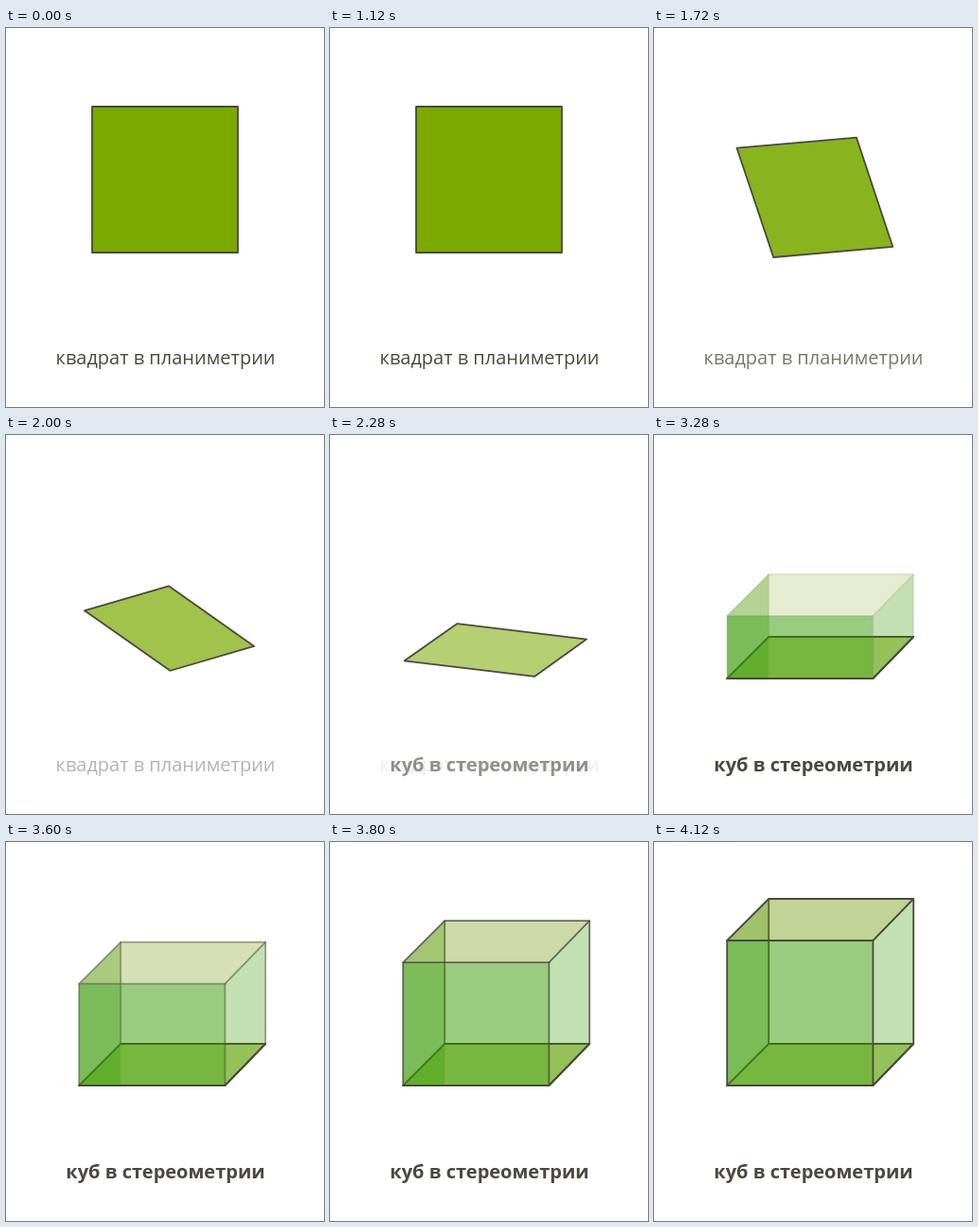
An HTML page with a canvas that plays this animation: 336x400 px, repeating every 4.6 s.

```html
<!DOCTYPE html>
<html lang="ru">
<head>
<meta charset="utf-8">
<title>Квадрат и куб</title>
<style>
html, body { margin: 0; width: 100%; height: 100%; overflow: hidden; background: #fff; }
canvas { display: block; width: 336px; height: 400px; }
</style>
</head>
<body>
<canvas id="stage"></canvas>
<script>
const W = 336, H = 400, LOOP = 4600;
const INK = '#4b493e';
const SQUARE = [[91, 83], [245, 83], [245, 237], [91, 237]];
// Same corner order: the square turns a quarter while it lies down.
const FLOOR = [[77.2, 257], [121.2, 213], [274.2, 213], [231.4, 257]];
const HEIGHT = 153;

const canvas = document.getElementById('stage');
const ctx = canvas.getContext('2d');
const dpr = window.devicePixelRatio || 1;
canvas.width = W * dpr;
canvas.height = H * dpr;

const progress = (t, start, end) => Math.min(1, Math.max(0, (t - start) / (end - start)));
const soften = x => x - 0.027 * Math.sin(2 * Math.PI * x);
const mix = (a, b, p) => a + (b - a) * p;

function trace(points, closed) {
  ctx.beginPath();
  points.forEach(([x, y]) => ctx.lineTo(x, y));
  if (closed) ctx.closePath();
}

function fill(points, color, alpha) {
  ctx.globalAlpha = alpha;
  ctx.fillStyle = color;
  trace(points, true);
  ctx.fill();
}

function stroke(points, alpha = 1, closed = false) {
  ctx.globalAlpha = alpha;
  ctx.strokeStyle = INK;
  trace(points, closed);
  ctx.stroke();
}

function caption(text, weight, alpha) {
  if (alpha <= 0) return;
  ctx.globalAlpha = alpha;
  ctx.fillStyle = INK;
  ctx.font = weight + ' 20px "Open Sans", "Noto Sans", sans-serif';
  ctx.fillText(text, 168.5, 355);
}

function drawWalls(floor, t) {
  const rise = soften(progress(t, 2680, 4040));
  if (rise <= 0) return;
  const lines = progress(t, 3200, 3960);
  const roof = floor.map(([x, y]) => [x, y - HEIGHT * rise]);
  const [a, b, c, d] = floor;
  const [e, f, g, h] = roof;
  const leftFoot = t < 4080 ? [b[0], a[1]] : b;

  fill([a, leftFoot, f, e], '#3a9900', 0.3);
  stroke([b, f], lines);
  fill([d, c, g, h], '#3a9900', 0.3);
  fill([a, d, h, e], '#359900', 0.5);
  fill(roof, '#6c9400', 0.41 * rise);
  stroke([a, d, c]);
  stroke(roof, lines, true);
  stroke([a, e], lines);
  stroke([d, h], lines);
  stroke([c, g], lines);
}

function draw(t) {
  ctx.setTransform(dpr, 0, 0, dpr, 0, 0);
  ctx.globalAlpha = 1;
  ctx.fillStyle = '#fff';
  ctx.fillRect(0, 0, W, H);
  ctx.lineWidth = 1.8;
  ctx.lineJoin = 'round';
  ctx.lineCap = 'round';
  ctx.textAlign = 'center';

  const turn = soften(progress(t, 1460, 2400));
  const base = SQUARE.map(([x, y], i) =>
    [mix(x, FLOOR[i][0], turn), mix(y, FLOOR[i][1], turn)]);
  fill(base, '#7aa900', 1 - turn / 2);
  stroke(base, 1, true);
  drawWalls(base, t);

  caption('квадрат в планиметрии', 400, 1 - turn);
  caption('куб в стереометрии', 700, progress(t, 2000, 2470));
}

const start = performance.now();
function tick() {
  draw((performance.now() - start) % LOOP);
  requestAnimationFrame(tick);
}
tick();
</script>
</body>
</html>
```
